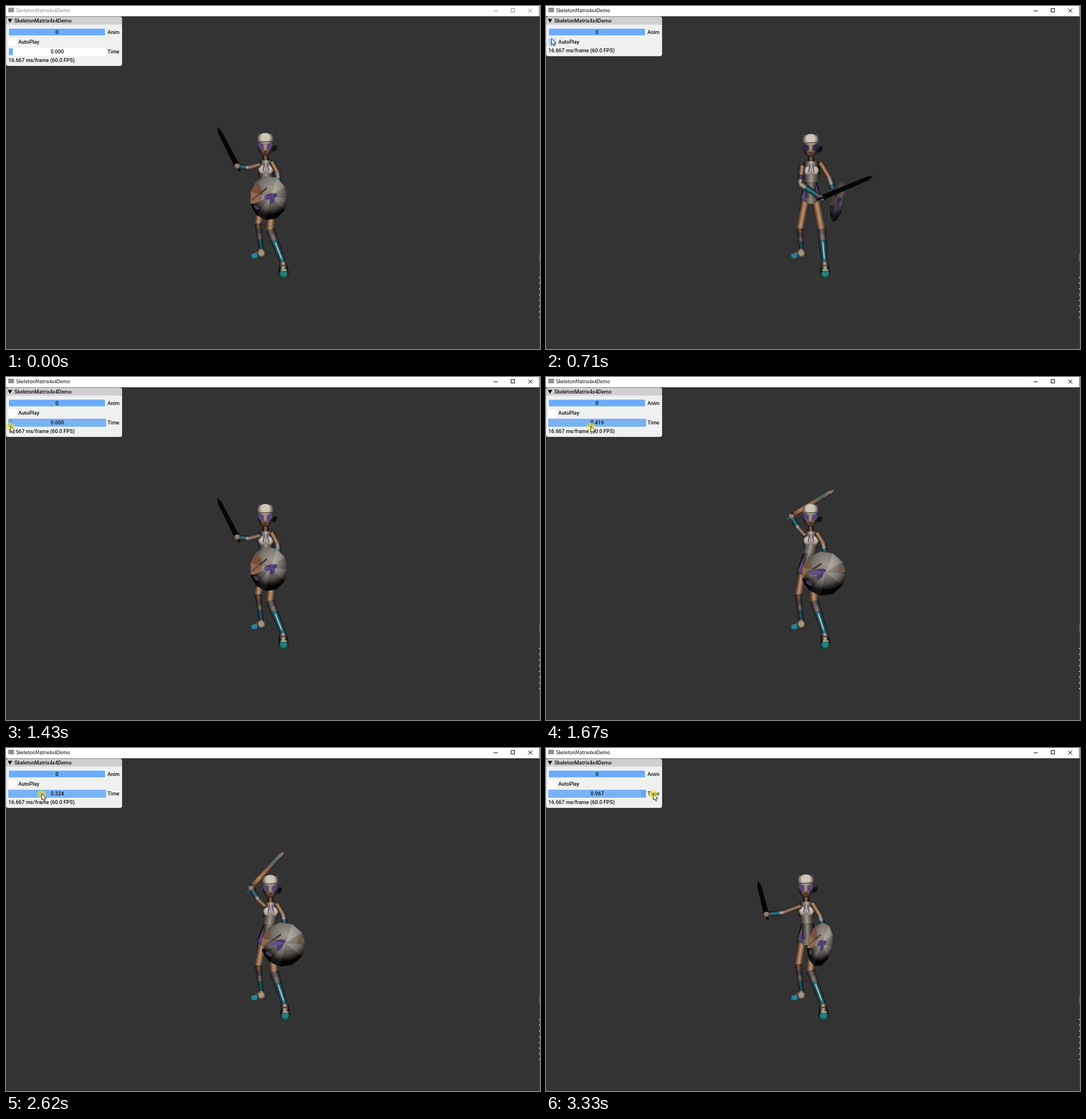
Write an HTML page with a canvas that moves like this. It is 933 px wide and 600 px high and loops after 3.64 s.

```html
<!DOCTYPE html>
<html lang="en">
<head>
<meta charset="utf-8">
<title>SkeletonMatrix4x4Demo</title>
<style>
html, body { margin: 0; width: 100%; height: 100%; overflow: hidden; background: #333; }
canvas { display: block; }
</style>
</head>
<body>
<canvas id="stage" width="933" height="600"></canvas>
<script>
const ctx = document.getElementById('stage').getContext('2d');
const LOOP = 3640, STEP = 80;
const SHADE = '#120e0c', SKIN = '#c4946f', CLOTH = '#bdb3a7', TEAL = '#2a8296', PURPLE = '#56437c';

// Joints in the four poses of a swing: guard, raised, struck, recovering
const POSES = {
  head: [[453, 240], [462, 240], [463, 242], [454, 239]],
  hip: [[456, 335], [457, 335], [463, 332], [457, 331]],
  handR: [[404, 280], [429, 244], [487, 338], [385, 291]],
  handL: [[476, 306], [487, 305], [502, 320], [483, 308]],
  shield: [[459, 336], [485, 344], [511, 342], [479, 344]],
  shieldR: [[33, 39], [39, 39], [11, 36], [22, 39]]
};
// Blade: [phase, angle in degrees, visible length]
const BLADE = [[0, -117, 77], [.324, -48, 86], [.419, -32, 88], [.6, -53, 51],
  [.815, -7, 105], [.967, -104, 61], [1, -117, 77]];
// Slider drags: [ms, phase]
const DRAG = [[1430, 0], [1670, .419], [2070, .815], [2300, .815], [2620, .324],
  [2780, .19], [3010, .19], [3330, .967]];

const clamp = (v, lo = 0, hi = 1) => Math.min(hi, Math.max(lo, v));
const mix = (a, b, k) => a + (b - a) * k;
const mixP = (a, b, k) => a.map((v, i) => mix(v, b[i], k));
const add = (p, x, y) => [p[0] + x, p[1] + y];
const noise = n => Math.abs(Math.sin(n * 12.9898) * 43758.5453) % 1;

function ease(from, to, v) {
  const k = clamp((v - from) / (to - from));
  return k * k * (3 - 2 * k);
}

// Linear interpolation of rows by their first column
function keyed(rows, v) {
  const next = clamp(rows.findIndex(r => r[0] > v), -1, rows.length);
  if (next === 0) return rows[0];
  if (next < 0) return rows.at(-1);
  const a = rows[next - 1], b = rows[next];
  return mixP(a, b, (v - a[0]) / (b[0] - a[0]));
}

function poseAt(u) {
  const strike = ease(.43, .6, u), back = ease(.82, .967, u), rest = ease(.967, 1, u);
  const raise = ease(0, .36, u) - strike;
  const struck = strike - back, recover = back - rest;
  const weights = [1 - raise - struck - recover, raise, struck, recover];
  const p = { raise, struck };
  for (const name in POSES) {
    p[name] = [0, 1].map(axis => POSES[name].reduce((sum, q, i) => sum + q[axis] * weights[i], 0));
  }
  const span = mix(10, 16, struck), [, angle, length] = keyed(BLADE, u);
  p.chest = add(p.head, 1, 34);
  p.shoulderR = add(p.chest, -span, 3);
  p.shoulderL = add(p.chest, span, -2);
  p.elbowR = add(mixP(p.shoulderR, p.handR, .5), -22 * struck, 4);
  p.elbowL = add(mixP(p.shoulderL, p.handL, .5), 4, 2);
  p.waist = mixP(p.chest, p.hip, .58);
  p.thighR = add(p.hip, -9, 6);
  p.thighL = add(p.hip, 9, 8);
  p.ankleR = [446, 426];
  p.ankleL = [mix(484, 487, raise + struck), 448];
  p.kneeR = add(mixP(p.thighR, p.ankleR, .5), -6, mix(-3, 8, struck));
  p.kneeL = add(mixP(p.thighL, p.ankleL, .5), -13 + 5 * raise + 16 * struck, -4);
  p.angle = angle * Math.PI / 180;
  p.length = length;
  return p;
}

function poly(points, fill) {
  ctx.beginPath();
  points.forEach(p => ctx.lineTo(...p));
  ctx.closePath();
  ctx.fillStyle = fill;
  ctx.fill();
}

function oval([x, y], rx, ry, fill, turn = 0) {
  ctx.beginPath();
  ctx.ellipse(x, y, rx, ry, turn, 0, 7);
  ctx.fillStyle = fill;
  ctx.fill();
}

function rect(x, y, w, h, fill) {
  ctx.fillStyle = fill;
  ctx.fillRect(x, y, w, h);
}

function line(a, b, color, width = 1) {
  ctx.beginPath();
  ctx.moveTo(...a);
  ctx.lineTo(...b);
  ctx.strokeStyle = color;
  ctx.lineWidth = width;
  ctx.stroke();
}

function gradient(g, colors) {
  colors.forEach((c, i) => g.addColorStop(i / (colors.length - 1), c));
  return g;
}

// Tapered segment, dark on both long edges
function limb(a, b, wa, wb, color) {
  const len = Math.hypot(b[0] - a[0], b[1] - a[1]) || 1;
  const nx = (b[1] - a[1]) / len, ny = (a[0] - b[0]) / len;
  const side = (p, w) => add(p, nx * w / 2, ny * w / 2);
  const across = ctx.createLinearGradient(...side(a, wa), ...side(a, -wa));
  poly([side(a, wa), side(b, wb), side(b, -wb), side(a, -wa)], gradient(across, [SHADE, color, SHADE]));
}

// Equal bands of colour along one segment
function bands(a, b, wa, wb, ...colors) {
  colors.forEach((color, i) => {
    const from = i / colors.length, to = (i + 1) / colors.length;
    limb(mixP(a, b, from), mixP(a, b, to), mix(wa, wb, from), mix(wa, wb, to), color);
  });
}

// Ball lit from above
function ball(p, rx, ry, light, dark, turn = 0) {
  const g = ctx.createRadialGradient(p[0], p[1] - ry * .4, 0, p[0], p[1], Math.max(rx, ry));
  oval(p, rx, ry, gradient(g, [light, light, dark]), turn);
}

function drawSword(p) {
  const copper = p.raise > .6, w = 4.5, l = p.length;
  const along = ctx.createLinearGradient(0, 0, l, 0);
  ctx.save();
  ctx.translate(...p.handR);
  ctx.rotate(p.angle);
  poly([[4, -w], [l - 10, -w + 1], [l, 0], [l - 10, w - 1], [4, w]],
    copper ? gradient(along, ['#4f382d', '#b5805c', '#8d6048', '#47646a', '#b5805c']) : '#050505');
  if (copper) line([6, 3], [l - 8, 3], '#38241b', 2);
  line([4, -6], [4, 6], SHADE, 3);
  line([-10, 0], [5, 0], copper ? '#175865' : SHADE, 4);
  ctx.restore();
}

function drawShield(p) {
  const [rx, ry] = p.shieldR, sides = 11, turned = clamp((39 - rx) / 6);
  const rim = i => [Math.cos(i * Math.PI * 2 / sides), Math.sin(i * Math.PI * 2 / sides)];
  const light = ctx.createRadialGradient(.15, -.45, 0, .05, -.35, 1.4);
  ctx.save();
  ctx.translate(...p.shield);
  ctx.rotate(clamp((33 - rx) / 60, 0, .2));
  ctx.scale(rx, ry);
  ctx.beginPath();
  for (let i = 0; i < sides; i++) ctx.lineTo(...rim(i));
  ctx.clip();
  rect(-1, -1, 2, 2, gradient(light, ['#b3aca1', '#a19a91', '#8a837c', '#5c5651', '#050404', '#000']));
  oval([-.9, -.25], .22 + .35 * turned, .5, '#8a5c42', .3);
  oval([.85, -.2], .18 * (1 - turned), .16, '#846650');
  line([-.9, .1], [-.1, -.45], '#54443a', .08);
  oval([-.25 + .35 * turned, -.08], .36, .13, PURPLE, -.2);
  oval([-.15 + .35 * turned, .05], .13, .24, PURPLE, .4);
  oval([-.65, .42], .17, .09, '#4e3d62', .6);
  for (let i = 0; i < sides; i++) {
    poly([[.1, -.05], rim(i), rim(i + 1)], noise(i + 3) > .5 ? '#fff1' : '#0002');
  }
  if (p.struck > .5) rect(-1, -1, 2, 2, '#1b152288');
  ctx.restore();
}

function drawLegs(p) {
  const toe = [434, 437];
  limb(p.thighR, p.kneeR, 17, 12, SKIN);
  bands(p.kneeR, p.ankleR, 12, 8, '#7d5844', '#57494c', '#77706c', '#1d5b6a', '#1d5b6a');
  limb(add(p.ankleR, 2, 0), toe, 11, 9, '#b3a18c');
  ball(add(p.ankleR, 0, 7), 8, 6, '#a5957f', SHADE);
  ball(toe, 8, 4.5, TEAL, '#0b2529', -.15);

  limb(p.thighL, p.kneeL, 18, 14, SKIN);
  bands(p.kneeL, p.ankleL, 16, 11, '#75696b', '#8b8084', TEAL, TEAL, TEAL, TEAL);
  line(mixP(p.kneeL, p.ankleL, .4), mixP(p.kneeL, p.ankleL, .9), '#bcc2bf', 2);
  const foot = add(p.ankleL, 1, 19);
  limb(p.ankleL, foot, 12, 18, '#c0af99');
  line(add(p.ankleL, -5, 6), add(p.ankleL, 6, 6), '#3b414f', 2);
  ball(add(foot, 0, 2), 9, 7, '#238078', '#081a1c', -.15);
  line(add(foot, -5, -5), add(foot, 6, -5), '#a69d90', 2);
}

function drawTorso(p) {
  const crotch = add(p.hip, 0, 14), wide = mix(17, 20, p.struck);
  limb(add(p.head, 0, 17), p.chest, 9, 13, '#936750');
  limb(add(p.chest, 0, -4), add(p.chest, 0, 18), wide * 1.3, wide * 1.6, CLOTH);
  limb(add(p.chest, 0, 18), p.waist, wide * 1.6, 21, '#a0978e');
  limb(p.waist, add(p.hip, 0, 4), 21, 36, '#8d857e');
  limb(add(p.hip, 0, 4), crotch, 36, 14, '#8d857e');
  for (const s of [-1, 1]) {
    poly([add(p.waist, s * 9, 4), add(p.hip, s * 17, 4), add(p.hip, s * 9, 11)], PURPLE);
    ball(add(p.chest, s * 6, 12), 7, 8, '#c5bbae', '#6b635d');
    line(add(p.chest, s * 5, 15), add(p.chest, s * 2, 1), '#665377', 2);
  }
}

function drawArms(p) {
  const low = p.struck > .5;
  limb(p.shoulderL, p.elbowL, 10, 9, SKIN);
  bands(p.elbowL, p.handL, 11, 10, '#b2a1ae', CLOTH, TEAL);
  if (low) bands(p.shoulderR, p.elbowR, 11, 11, SKIN, SKIN, PURPLE, CLOTH);
  else limb(p.shoulderR, p.elbowR, 10, 8, '#a38674');
  bands(p.elbowR, p.handR, low ? 13 : 10, 8, CLOTH, TEAL, TEAL, '#7c7279');
  ball(p.handR, 6, 4.5, '#8b7d70', '#2c241f');
}

function drawHead({ head, struck }) {
  const at = (x, y) => add(head, x, y);
  oval(at(16, 9), 4, 6, '#121013', .6);
  for (const s of [-1, 1]) poly([at(s * 5, -15), at(s * 13, -18), at(s * 13, -7)], '#4a414b');
  oval(at(0, 6), 13, 16, '#231c1d');
  ball(at(0, 10), 8, 12, '#7d5847', '#35251f');
  for (const s of [-1, 1]) oval(at(s * 8, 5), 4, 7, struck > .5 ? '#302844' : PURPLE, s * .4);
  oval(at(0, 5), 2.5, 7, '#9a8f86');
  line(at(-3, 15), at(3, 15), '#3d231e', 1.5);
  ball(at(0, -8), 14, 10, '#cfc6b8', '#4c4540');
  line(at(-12, -2), at(12, -3), '#4d4540', 1.5);
}

function drawFighter(u) {
  const p = poseAt(u), low = p.struck > .5;
  const body = [drawLegs, drawTorso, drawArms, drawHead];
  const order = low ? [drawShield, ...body, drawSword] : [drawSword, ...body, drawShield];
  order.forEach(draw => draw(p));
}

function label(text, x, y, align = 'left') {
  ctx.font = '500 9.1px Roboto, sans-serif';
  ctx.textAlign = align;
  ctx.fillStyle = '#111';
  ctx.fillText(text, x, y);
}

function drawWindow(active) {
  const ink = active ? '#000' : '#888';
  rect(0, 0, 933, 600, '#333');
  rect(0, 0, 933, 18, '#fff');
  rect(4, 3, 10, 8, '#8a9098');
  ctx.font = '8.3px "Noto Sans CJK SC", "Noto Sans", sans-serif';
  ctx.textAlign = 'left';
  ctx.textBaseline = 'middle';
  ctx.fillStyle = ink;
  ctx.fillText('SkeletonMatrix4x4Demo', 17.5, 8);
  line([852, 8.5], [859, 8.5], ink);
  ctx.strokeRect(882.5, 4.5, 6, 6);
  line([912.5, 4.5], [919.5, 11.5], ink);
  line([919.5, 4.5], [912.5, 11.5], ink);
  rect(931.5, 0, 1, 600, '#484848');
  rect(931.5, 433, 1.5, 14, '#14838c');
  for (let y = 474; y < 550; y += 10) rect(931.5, y, 1.5, 2, '#ccc');
}

function drawPanel({ auto, drag, hover, u }) {
  const bottom = auto ? 88 : 105;
  ctx.beginPath();
  ctx.roundRect(0, 18.5, 203, bottom - 18.5, 4);
  ctx.fillStyle = '#eff0f0';
  ctx.fill();
  ctx.save();
  ctx.clip();
  rect(0, 18, 203, 14.5, '#d0d0d0');
  ctx.restore();
  ctx.strokeStyle = '#0004';
  ctx.lineWidth = 1;
  ctx.stroke();
  poly([[3, 22.5], [11, 22.5], [7, 29.5]], '#111');
  label('SkeletonMatrix4x4Demo', 14.5, 26);
  rect(4, 38.5, 170, 14, '#fff');
  rect(5, 39.5, 168, 12, '#6aacfa');
  label('0', 89, 46, 'center');
  label('Anim', 177.3, 46);
  rect(4, 56, 14, 14, hover ? '#b9dafa' : '#fff');
  label('AutoPlay', 21.5, 63);
  if (!auto) {
    rect(4, 73, 171, 14, drag ? '#78b3f5' : '#fff');
    rect(5 + 167 * Math.min(u, .967), 74, 7, 12, drag ? '#6ca5ea' : '#6aacfa');
    label(u.toFixed(3), 89.5, 80.5, 'center');
    label('Time', 177.3, 80.5);
  }
  label('16.667 ms/frame (60.0 FPS)', 4, bottom - 9.5);
}

function drawCursor(x, y, pressed) {
  if (pressed) oval([x, y + 1], 7.5, 7.5, '#f2e01e99');
  ctx.save();
  ctx.translate(x, y);
  const arrow = new Path2D('M0 0V11L2.6 8.7L4.3 12.6L6.3 11.7L4.6 8H8Z');
  ctx.fillStyle = '#fff';
  ctx.fill(arrow);
  ctx.strokeStyle = '#222';
  ctx.lineWidth = 1;
  ctx.stroke(arrow);
  ctx.restore();
}

// The picture moves in steps, with three longer rests
function stepTime(t) {
  const run = [[3090, 3330], [2380, 2780], [70, 2070]].find(r => t >= r[0]);
  return run ? Math.min(run[1], t - (t - run[0]) % STEP) : 0;
}

function stateAt(t) {
  const auto = t >= 150 && t < 1190, drag = t >= 1350;
  let u = t >= 1190 ? .39 : 0;
  if (auto) u = (4.6 + .31 * (t - 390) / STEP) % 1;
  if (drag) u = keyed(DRAG, t)[1];
  return { auto, drag, u, hover: t > 0 && t < 1270 };
}

function render() {
  const t = stepTime(performance.now() % LOOP), s = stateAt(t);
  drawWindow(t > 0);
  drawFighter(s.u);
  drawPanel(s);
  if (s.drag) drawCursor(8 + 168 * s.u + (t < 3330 ? 0 : 17), t < 2380 ? 86 : 80, true);
  else if (t > 0) drawCursor(9.5, t < 1270 ? 57 : 74, false);
  requestAnimationFrame(render);
}
render();
</script>
</body>
</html>
```
